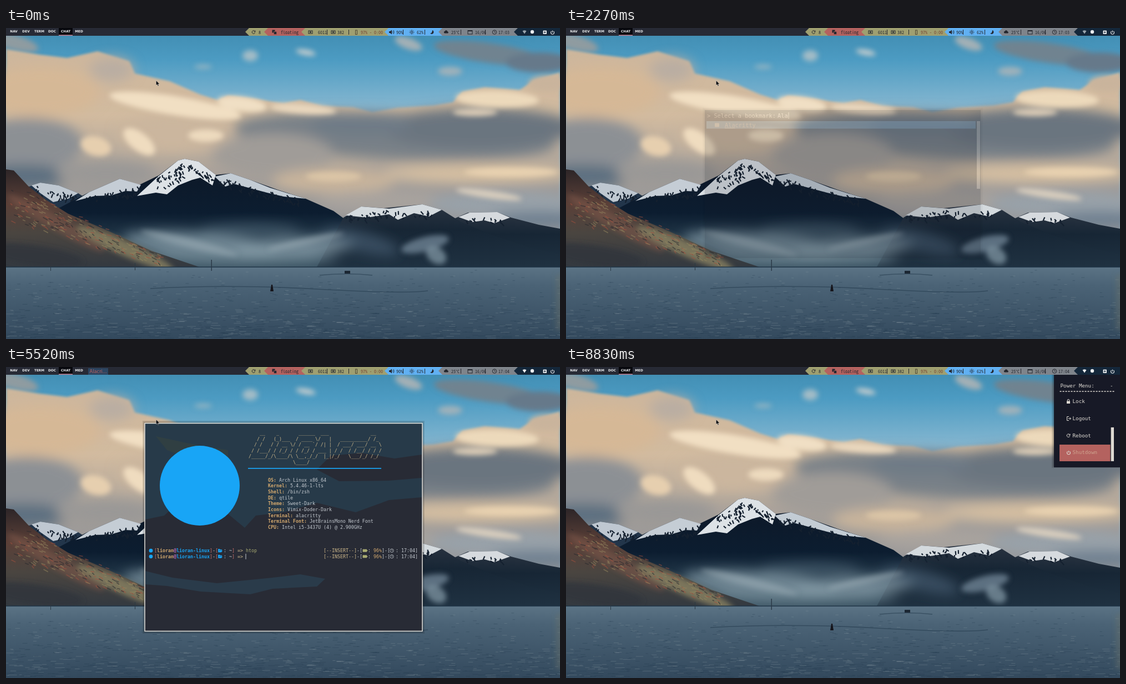
Write an HTML page that moves like this. It is 998 px wide and 561 px high and loops after 8930 ms.

```html
<!DOCTYPE html>
<html lang="en">
<head>
<meta charset="utf-8">
<title>Desktop session</title>
<style>
  html, body { margin: 0; width: 100%; height: 100%; overflow: hidden; background: #31485c; }
  svg { position: absolute; left: 0; top: 0; width: 998px; height: 561px; }
  #wall { will-change: transform; }
  text { white-space: pre; }
  .term { font: 8.3px "DejaVu Sans Mono", monospace; }
  .menu { font: 10.3px "DejaVu Sans Mono", monospace; }
  .power { font: 9.25px "DejaVu Sans Mono", monospace; }
  .bar { font: 8px "Noto Sans Mono CJK JP", "Noto Sans CJK JP", "Noto Sans CJK", monospace; }
  .tag { font: bold 5.8px "DejaVu Sans", sans-serif; text-anchor: middle; }
  .task { font: 8.3px "DejaVu Sans", sans-serif; }
</style>
</head>
<body>
<svg id="wall" viewBox="0 0 998 561"></svg>
<svg id="ui" viewBox="0 0 998 561"></svg>
<script>
const LOOP = 8930;
const $ = id => document.getElementById(id);

let seed = 7;
const rnd = () => (seed = seed * 16807 % 2147483647) / 2147483647;
const times = (n, fn) => Array.from({ length: n }, (_, i) => fn(i)).join('');

const rect = (x, y, w, h, fill, extra = '') =>
  `<rect x="${x}" y="${y}" width="${w}" height="${h}" fill="${fill}" ${extra}/>`;
const path = (d, fill, extra = '') => `<path d="${d}" fill="${fill}" ${extra}/>`;
const stroke = (d, color, width = 1, extra = '') =>
  path(d, 'none', `stroke="${color}" stroke-width="${width}" ${extra}`);
const dot = (x, y, r, fill, extra = '') => `<circle cx="${x}" cy="${y}" r="${r}" fill="${fill}" ${extra}/>`;
const blob = (x, y, rx, ry, fill, turn = 0, alpha = 1) =>
  `<ellipse cx="${x}" cy="${y}" rx="${rx}" ry="${ry}" fill="${fill}" opacity="${alpha}" transform="rotate(${turn} ${x} ${y})"/>`;
const text = (x, y, str, fill, cls, extra = '') =>
  `<text x="${x}" y="${y}" fill="${fill}" class="${cls}" ${extra}>${str}</text>`;
const group = (id, body, extra = '') => `<g id="${id}" ${extra}>${body}</g>`;
const ramp = (id, stops, dir = 'x2="0" y2="1"') => `<linearGradient id="${id}" ${dir}>` +
  stops.map(([o, c]) => `<stop offset="${o}" stop-color="${c}"/>`).join('') + '</linearGradient>';
const blur = (id, d) => `<filter id="${id}" filterUnits="userSpaceOnUse" x="-40" y="-40" width="1080" height="640">` +
  `<feGaussianBlur stdDeviation="${d}"/></filter>`;
const soft = (f, ...parts) => `<g filter="url(#${f})">${parts.join('')}</g>`;

// ---------- wallpaper ----------
const rocks = (x0, y0, x1, y1, n, depth) => stroke(times(n, () => {
  const k = rnd(), x = x0 + (x1 - x0) * k, y = y0 + (y1 - y0) * k + 4 + rnd() * depth;
  return `M${x} ${y}l${-4 + rnd() * 10} ${2 + rnd() * 5}`;
}), '#14202f', 2.2);
const ripples = (n, color) => stroke(times(n, () => {
  const k = Math.sqrt(rnd());
  return `M${rnd() * 998} ${434 + k * 126}h${4 + rnd() * 16 * k}`;
}), color, 1, 'opacity=".3"');
const specks = (n, color) => stroke(times(n, () => {
  const k = rnd();
  return `M${8 + k * 270} ${280 + k * 128 + rnd() * (1 - k * .7) * 70}l${3 + rnd() * 6} ${1 + rnd() * 4}`;
}), color, 1.6, 'opacity=".55"');

$('wall').innerHTML = '<defs>' +
  ramp('sky', [[0, '#3f8bb0'], [.1, '#4c9bc2'], [.25, '#84b6d0'], [1, '#9ab2c0']]) +
  ramp('cloud', [[0, '#cdb69c'], [.3, '#d2bba0'], [.62, '#a09c99'], [1, '#8d9299']]) +
  ramp('peak', [[0, '#0d1726'], [.5, '#0c1d30'], [.75, '#243a4b'], [1, '#324a5a']]) +
  ramp('ridge', [[0, '#2b3441'], [.4, '#172635'], [1, '#1f3141']]) +
  ramp('hill', [[0, '#2c2527'], [.35, '#5b4038'], [.65, '#4a4540'], [1, '#333940']]) +
  ramp('water', [[0, '#5b7385'], [.25, '#4b6376'], [1, '#33495d']]) +
  blur('wide', 11) + blur('mid', 5) + blur('fine', 2) + '</defs>' +
  rect(0, 0, 998, 561, 'url(#sky)') +
  soft('mid', blob(440, 50, 14, 10, '#a3bcc6'), blob(540, 44, 18, 5, '#c3ccce', 10), blob(355, 70, 16, 4, '#8fb3c2'),
    blob(725, 28, 26, 10, '#a3b0b6', 20), blob(870, 45, 100, 18, '#708390', 8), blob(960, 62, 60, 18, '#66798a'),
    blob(800, 78, 22, 8, '#9eb1ba'), blob(10, 25, 50, 14, '#8f9ba0', 15)) +
  soft('fine', path('M0 38L60 48 110 54 165 42 222 60 232 82 295 96 350 120 382 130 400 122 450 128 500 136 530 130 570 141 625 143 660 152 705 144 770 140 805 134 822 115 862 107 925 112 950 95 998 80V440H0Z', 'url(#cloud)')) +
  soft('wide', blob(60, 115, 110, 45, '#d5b896'), blob(190, 75, 40, 22, '#b9ada2'), blob(40, 210, 100, 48, '#8c9094'),
    blob(30, 268, 90, 22, '#5d7080'), blob(180, 262, 90, 24, '#9a9896'), blob(300, 190, 100, 35, '#cbb69e'),
    blob(700, 195, 290, 42, '#788087', 3), blob(850, 180, 180, 36, '#6a747f'), blob(640, 175, 90, 20, '#6e7a86'),
    blob(480, 230, 110, 40, '#a09c98'), blob(590, 275, 110, 22, '#c8b49b'), blob(850, 262, 170, 17, '#d6bfa1'),
    blob(680, 312, 120, 20, '#a8a39e'), blob(900, 318, 140, 24, '#98a1a9'), blob(960, 345, 90, 14, '#6c7e8f')) +
  soft('mid', blob(305, 140, 120, 17, '#f1dfc3', 9), blob(425, 137, 45, 13, '#f0dfc4', 8), blob(535, 146, 60, 9, '#e9d7bd', 4),
    blob(240, 205, 34, 16, '#efdcbf', 38), blob(162, 213, 28, 17, '#e6cfaf', 15), blob(360, 194, 32, 11, '#eddabe'),
    blob(885, 128, 75, 15, '#ecd9bb', 2), blob(845, 152, 40, 7, '#d9cab5'), blob(975, 100, 34, 14, '#c9b49c'),
    blob(590, 268, 50, 9, '#dac4a6'), blob(910, 260, 85, 8, '#e8d1b0'), blob(870, 300, 60, 7, '#d8cdbd', 8)) +
  path('M30 290L62 279 95 284 130 298 180 330V431H0Z', '#22354a') +
  path('M46 284L62 279 95 284 130 298 112 308 85 314 62 298Z', '#bfc8d1') + rocks(50, 280, 125, 296, 32, 14) +
  path('M805 345L832 333 885 332 910 342 960 355 998 362V431H805Z', 'url(#ridge)') +
  path('M815 341L835 333 885 332 908 342 880 352 862 347 840 350Z', '#d6dade') + rocks(825, 336, 900, 338, 12, 10) +
  path('M95 325L150 296 205 272 240 283 275 266 310 239 322 236 347 241 378 265 405 262 440 274 490 292 540 308 590 330 620 352 680 431H70Z', 'url(#peak)') +
  path('M125 312L150 296 205 272 243 283 236 295 215 294 190 302 160 303Z', '#c5cdd5') + rocks(145, 300, 240, 281, 40, 14) +
  path('M236 303L275 267 310 239 322 236 347 241 378 265 372 284 350 270 335 274 310 284 290 300 270 297Z', '#dde2e6') +
  rocks(272, 266, 320, 238, 40, 28) + rocks(325, 238, 378, 264, 30, 13) +
  path('M376 268L405 262 440 274 475 288 540 308 500 304 470 297 440 289 410 281 395 286Z', '#c3ccd4') + rocks(385, 264, 530, 304, 60, 15) +
  path('M608 342L640 322 680 325 750 318 785 328 820 350 880 375 940 395 998 408V431H560Z', 'url(#ridge)') +
  path('M612 338L640 322 665 324 690 326 750 318 785 328 762 340 735 334 706 346 690 336 650 342Z', '#d4dade') +
  rocks(615, 333, 690, 324, 30, 13) + rocks(700, 325, 780, 324, 14, 14) +
  soft('wide', blob(350, 392, 140, 22, '#8299a6', 5, .8), blob(520, 396, 110, 17, '#8fa4b0', -4, .75), blob(440, 365, 90, 12, '#526b7c', 0, .6),
    blob(640, 385, 70, 18, '#4c6578', 15, .6), blob(400, 418, 200, 12, '#6b8391', 0, .7)) +
  soft('mid', blob(755, 390, 44, 13, '#73899a', -14, .75), blob(775, 410, 20, 14, '#8196a3', 35, .75),
    blob(330, 388, 90, 8, '#a0b1b9', 14, .5), blob(540, 385, 70, 6, '#a4b4bc', -12, .5)) +
  path('M0 255L14 257 40 285 72 310 112 335 182 365 262 402 348 431H0Z', 'url(#hill)') +
  soft('mid', blob(90, 352, 100, 12, '#7c5848', 30, .6), blob(215, 398, 95, 13, '#8b8262', 24, .8), blob(50, 410, 90, 18, '#30353b', 8, .8)) +
  specks(70, '#a4503f') + specks(90, '#94875f') + specks(70, '#25272c') +
  rect(0, 431, 998, 130, 'url(#water)') + rect(0, 430.5, 998, 1.5, '#23384a') +
  ripples(620, '#20374b') + ripples(420, '#8d9ca4') +
  stroke('M260 470Q400 462 560 471T760 474M565 446Q615 441 660 446', '#2b4255', 1.6, 'opacity=".7"') +
  path('M476 475L478 463 480 463 482 475Z', '#16151b') + rect(369.5, 418, 1.5, 20, '#2b3a48') +
  rect(610, 438, 10, 5, '#1b2632') + rect(232, 424, 1, 13, '#2a3944') + rect(80, 430, 1, 8, '#2a3944') +
  soft('mid', rect(992, 445, 10, 100, '#6c7468', 'opacity=".5"'));

// ---------- top bar ----------
const ink = '#23262e', white = '#eceef0';
const segment = (tip, fill) => path(`M${tip} 7L${tip + 7} 0H998V14H${tip + 7}Z`, fill);
const label = (x, str, fill = ink) => text(x, 10.6, str, fill, 'bar');
const powerIcon = (x, y, r, c) =>
  stroke(`M${x - r * .6} ${y - r * .7}A${r} ${r} 0 1 0 ${x + r * .6} ${y - r * .7}M${x} ${y - r - .6}V${y}`, c, 1.1);
const loopIcon = (x, y, c) => stroke(`M${x + 2} ${y - 2}A2.8 2.8 0 1 0 ${x + 2.6} ${y + 1}M${x + 3} ${y - 3}v2.4h-2.4`, c, 1);
const tags = [['NAV', 14], ['DEV', 36], ['TERM', 60], ['DOC', 83], ['CHAT', 107.6], ['MED', 131.6]];

const topBar = rect(0, 0, 998, 14, '#272a35') + rect(95, 0, 25, 14, '#07080d') + rect(95, 12.3, 25, 1.7, '#b77f93') +
  tags.map(([s, x]) => text(x, 8.2, s, white, 'tag')).join('') +
  segment(431, '#9f9f70') + segment(465, '#b4625f') + segment(532, '#9f9f70') +
  segment(682, '#61b0f2') + segment(779, '#7f848b') + segment(915, '#14273a') +
  loopIcon(446, 7.5, ink) + label(455, '8') +
  rect(479.5, 3.5, 5, 5, ink) + rect(482.5, 6.5, 5, 5, ink, 'stroke="#b4625f" stroke-width=".6"') + label(495, 'floating') +
  [545, 586].map(x => rect(x, 5, 7, 5, 'none', `stroke="${ink}"`) + rect(x + 2, 6.4, 3, 2.2, ink)).join('') +
  label(562, '6011') + label(597, '382') + [582, 621, 719, 758, 823, 867].map(x => rect(x - 4, 3, 1, 9, ink)).join('') +
  rect(629.5, 4, 3, 7.5, 'none', 'stroke="#4f4a35"') + label(639, '97% - 0:00', '#75402f') +
  path('M690 6h2l3-2.5v8l-3-2.5h-2z', ink) + stroke('M696.5 5.5q1.5 2 0 4M698 4q2.5 3.5 0 7', ink, .8) + label(703, '90%') +
  dot(731, 7.5, 1.8, 'none', `stroke="${ink}"`) +
  times(8, i => stroke('M731 4.6v-1.6', ink, .9, `transform="rotate(${i * 45} 731 7.5)"`)) + label(740, '62%') +
  path('M768 4a3.6 3.6 0 1 1-4 5.600q4 0 4-5.600z', ink) +
  path('M790 9.500a2 2 0 0 1 .6-3.800a2.600 2.600 0 0 1 4.800.6a1.700 1.700 0 0 1 .6 3.200z', ink) + label(802, '25°C') +
  rect(832, 4.5, 8, 6.5, 'none', `stroke="${ink}"`) + rect(832, 4, 8, 2, ink) + label(845, '16/06') +
  dot(880, 7.5, 3.7, 'none', `stroke="${ink}"`) + stroke('M880 5v2.600h2', ink, .8) +
  text(887, 10.6, '', ink, 'bar', 'id="clock"') +
  path('M930.5 5.500q3.500-2.500 7 0L934 10.500z', '#9aa5ae', 'id="wifi"') +
  dot(948, 7, 3.2, white) + rect(967.5, 4.5, 6.5, 6.5, white, 'rx="1"') + stroke('M968.700 7.750h4M970.700 5.750v4', '#14273a', 1) +
  powerIcon(984.5, 8, 3, white) +
  group('task', rect(148, 2, 36, 12, '#2d4560') + text(150.5, 11, 'Alacri...', '#bd625f', 'task'));

// ---------- application menu ----------
const panel = '#171926', cream = '#dedad3';
const shadow = (x, y, w, h) => rect(x - 4, y - 4, w + 8, h + 8, '#000', 'opacity=".12"') + rect(x - 2, y - 2, w + 4, h + 4, '#000', 'opacity=".15"');
const apps = ['Bluetooth Manager', 'Calendar', 'Meadow Source Edit', 'Forgly', 'Gimp', 'Inkscape', 'LibreOffice',
  'Neovim', 'Ranger', 'SpaceFM', 'Tunelio', 'Vim', 'Virtual Workspaces', 'Clipora'];
const menu = shadow(250, 148, 497, 267) + rect(250, 148, 497, 267, panel) +
  text(254, 161.5, '&gt; Select a bookmark:', cream, 'menu') + text(381, 161.5, '', white, 'menu', 'id="query"') +
  rect(0, 152, 1, 12, white, 'id="caret"') + rect(253, 168, 485, 13.5, '#5f9ccb') +
  rect(268, 171.500, 8, 7, white, 'rx="1"') + text(286, 178.6, 'Alacritty', white, 'menu') +
  rect(286, 180, 0, 1, white, 'id="match"') + rect(740, 168, 6, 122, cream) +
  group('apps', apps.map((name, i) => {
    const y = 193 + i * 14.35;
    return dot(272, y - 3.5, 3.8, cream) + text(286, y, name, cream, 'menu');
  }).join(''));

// ---------- terminal ----------
const blue = '#18a5f6', tan = '#d2a86e', pale = '#c3c9cf', red = '#c7716c', olive = '#a9ac72', sand = '#cdb88b';
const baseY = row => 122 + row * 10.61;
const colX = col => 257 + col * 5;
const spans = (col, row, parts) => text(colX(col), baseY(row),
  parts.map(([s, c, bold]) => `<tspan fill="${c}"${bold ? ' font-weight="bold"' : ''}>${s}</tspan>`).join(''), pale, 'term');

const banner = [
  "    __    _       ______  ___               __",
  "   / /   (_)___  / ____ \\/   |   __________/ /_",
  "  / /   / / __ \\/ / __ `/ /| |  / ___/ ___/ __ \\",
  " / /___/ / /_/ / / /_/ / ___ | / /  / /__/ / / /",
  "/_____/_/\\____/\\ \\__,_/_/  |_|/_/   \\___/_/ /_/",
  "                \\____/"];
const info = { OS: 'Arch Linux x86_64', Kernel: '5.4.46-1-lts', Shell: '/bin/zsh', DE: 'qtile', Theme: 'Sweet-Dark',
  Icons: 'Vimix-Doder-Dark', Terminal: 'alacritty', 'Terminal Font': 'JetBrainsMono Nerd Font', CPU: 'Intel i5-3437U (4) @ 2.900GHz' };
const fetchInfo = dot(349, 214, 72, blue) +
  banner.map((s, i) => spans(36, i, [[s, sand]])).join('') + rect(436, 182, 240, 1.7, blue) +
  Object.entries(info).map(([k, v], i) => spans(43, 8 + i, [[k + ':', tan, 1], [' ' + v, pale]])).join('');

const leftPrompt = row => {
  const y = baseY(row) - 3;
  return dot(261, y, 3.4, blue) + spans(2, row, [['[', red], ['lioran', tan, 1], ['@', '#bb6fc0', 1], ['lioran-linux', blue, 1],
    [']', red], ['-', pale], ['[', red], ['  ', pale], [': ~', pale], [']', red], [' =&gt;', sand]]) +
    path(`M382 ${y + 3}v-6h3l1 1h3v1.500h-5zl2-3h6l-2 3z`, blue);
};
const rightPrompt = row => {
  const y = baseY(row) - 3;
  return spans(63, row, [['[--INSERT--]', sand], ['-[', pale], ['  ', pale], [': ', pale], ['96%', tan], [']-[', pale], ['  : 17:04]', pale]]) +
    rect(642.5, y - 2.5, 7.5, 5, olive) + rect(650, y - 1, 1.3, 2, olive) +
    dot(695, y, 3.2, 'none', `stroke="${pale}" stroke-width=".8"`) + stroke(`M695 ${y - 2}v2h1.500`, pale, .7);
};
const command = (id, row) => `<text x="${colX(35)}" y="${baseY(row)}" class="term"><tspan id="${id}"></tspan><tspan id="${id}Rest" fill="#6b7280"></tspan></text>`;

const meter = (col, row, name, fill, value) => spans(col, row, [[name.padEnd(4), blue], ['[', pale, 1], ['|'.repeat(fill), olive],
  [value.padStart(36 - fill), '#7b828c'], [']', pale, 1]]);
const tools = ['/usr/lib/Xorg :0 vt1', 'python /usr/bin/qtile', 'picom -b', 'alacritty', 'htop', '/bin/zsh', 'dunst', 'nm-applet',
  'pulseaudio', '/usr/lib/systemd/systemd --user', 'dbus-daemon --session'];
const processRow = i => {
  const pid = String(i === 4 ? 4127 : 391 + i * 67).padStart(5);
  const share = Math.max(0, 4.6 - i * .7).toFixed(1).padStart(5);
  const line = `${pid} lioran     20   0 ${String(62 + i * 37 % 400).padStart(5)}M ${String(9 + i * 23 % 90).padStart(4)}M  ${String(8 + i * 11 % 40).padStart(4)}M S ${share}  ${(1.9 - i * .06).toFixed(1)}  0:0${i % 9}.${10 + i * 7 % 80} ${tools[i % tools.length]}`;
  return (i ? '' : rect(255, baseY(8) - 8, 490, 10.6, '#4f98b8')) + spans(0, 8 + i, [[line, i ? pale : ink]]);
};
const keys = ['Help  ', 'Setup ', 'Search', 'Filter', 'Tree  ', 'SortBy', 'Nice -', 'Nice +', 'Kill  ', 'Quit  '];
const htop = meter(1, 0, '1', 2, '4.6%') + meter(1, 1, '2', 3, '6.0%') + meter(1, 2, '3', 1, '2.0%') + meter(1, 3, '4', 2, '3.9%') +
  meter(1, 4, 'Mem', 9, '1.02G/7.68G') + meter(1, 5, 'Swp', 0, '0K/8.00G') +
  spans(49, 0, [['Tasks: ', blue], ['68', pale, 1], [', ', blue], ['191', olive, 1], [' thr; ', blue], ['1', olive, 1], [' running', blue]]) +
  spans(49, 1, [['Load average: ', blue], ['0.42 0.51 0.48', pale, 1]]) + spans(49, 2, [['Uptime: ', blue], ['01:12:36', pale, 1]]) +
  rect(255, baseY(7) - 8, 490, 10.6, olive) +
  spans(0, 7, [['  PID USER       PRI  NI  VIRT   RES   SHR S CPU% MEM%   TIME+  Command', ink]]) +
  group('processes', times(24, processRow) +
    keys.map((k, i) => rect(colX(2 + i * 8.300), baseY(33) - 8, 31, 10, '#4f98b8') +
      spans(i * 8.300, 33, [['F' + (i + 1), pale], [k, ink]])).join(''));

const terminal = shadow(250, 101, 500, 376) + rect(250, 101.5, 500, 375, '#282b35') +
  path('M251 102H749V158L700 165 640 155 585 160 560 185 600 206 690 205 749 200V235L690 240 630 262 560 245 500 262 450 268 430 290 400 265 375 240 345 232 310 245 285 268 251 275Z', '#273a49') +
  path('M270 125L340 140 400 150 400 168 340 168 290 150Z', '#36433f', 'opacity=".6"') +
  path('M251 368L300 380 380 390 480 380 530 374 575 382 560 396 480 400 440 410 350 405 290 395 251 392Z', '#2a3b4a') +
  rect(250, 101.5, 500, 375, 'none', 'stroke="#e6e5e0" stroke-width="1.5"') +
  group('shell', group('fetch', fetchInfo) + group('left', leftPrompt(20)) + group('right', rightPrompt(20)) + command('first', 20) +
    group('again', leftPrompt(21) + rightPrompt(21) + command('second', 21)) + rect(0, 0, 1, 10, pale, 'id="cursor"')) +
  group('htop', htop);

// ---------- power menu ----------
const choices = ['Lock', 'Logout', 'Reboot', 'Shutdown'];
const rowY = i => 48 + i * 30.67;
const power = shadow(879, 14, 123, 164) + rect(879, 14, 119, 167, panel) +
  text(890.5, 37.3, 'Power Menu:', cream, 'power') + rect(955, 28, 1.2, 11, cream, 'id="blink"') + text(980, 37.3, '-', cream, 'power') +
  stroke('M889.500 44h98', cream, 1.3, 'stroke-dasharray="3 2"') +
  rect(889, 0, 91.5, 30, '#b4625f', 'id="pick"') + rect(981.7, 0, 5.3, 61, cream, 'id="thumb"') +
  rect(902, 61.500, 6, 4.5, cream) + stroke('M903.300 62v-2a1.700 1.700 0 0 1 3.400 0v2', cream, 1) +
  stroke('M906 89.500h-3.500v7h3.500M904.500 93h5M907.500 91l2 2-2 2', cream, 1) +
  loopIcon(905, 123.7, cream) + powerIcon(905.5, 154.5, 3, cream) +
  choices.map((s, i) => text(912.5, rowY(i) + 17.3, s, cream, 'power', `id="choice${i}"`)).join('');

$('ui').innerHTML = '<defs><clipPath id="below"><rect y="14" width="998" height="547"/></clipPath></defs>' + topBar +
  group('terminal', terminal) + group('menu', menu) + group('power', power, 'clip-path="url(#below)"') +
  path('M270.500 95v8.300l2-1.700 1.200 2.900 1.400-.6-1.200-2.800h2.600z', '#05060a', 'stroke="#d8d8d8" stroke-width=".4"');

// ---------- timeline ----------
const at = (t, start, steps) => steps.reduce((v, [time, next]) => t >= time ? next : v, start);
const attr = (id, name, value) => {
  const el = $(id);
  if (el.getAttribute(name) !== String(value)) el.setAttribute(name, value);
};
const write = (id, str) => { if ($(id).textContent !== str) $(id).textContent = str; };
const show = (id, on) => attr(id, 'visibility', on ? 'inherit' : 'hidden');
const fade = (id, alpha) => { attr(id, 'opacity', alpha); attr(id, 'visibility', alpha ? 'visible' : 'hidden'); };
const valid = ['htop', 'ex', 'exit'];

function typeCommand(id, word, count) {
  const typed = word.slice(0, count);
  write(id, typed);
  write(id + 'Rest', count ? word.slice(count) : '');
  attr(id, 'fill', valid.includes(typed) ? olive : red);
}

function render(t) {
  fade('menu', at(t, 0, [[1390, .12], [1440, .38], [1500, .65], [1560, .92], [1640, .97], [2170, .72], [2220, .44], [2270, .16], [2330, 0]]));
  const letters = at(t, 0, [[1640, 1], [1840, 2], [1950, 3]]);
  write('query', 'Ala'.slice(0, letters));
  attr('caret', 'x', 382 + letters * 6.2);
  attr('match', 'width', letters * 6.2);
  show('apps', !letters);

  fade('terminal', at(t, 0, [[2330, .25], [2380, .5], [2430, .75], [2480, 1], [7030, .8], [7080, .6], [7130, .4], [7180, .2], [7230, 0]]));
  show('task', t >= 2330 && t < 7180);
  write('clock', t < 2330 ? '17:03' : '17:04');
  attr('wifi', 'fill', t < 3690 ? '#9aa5ae' : white);

  const inHtop = t >= 4620 && t < 5520;
  show('shell', !inHtop);
  show('htop', inHtop);
  show('processes', inHtop && t >= 4720);
  show('fetch', t >= 3000);
  show('left', t >= 3230);
  show('right', t >= 3280);
  show('again', t >= 5520);
  const first = at(t, 0, [[3640, 1], [3750, 2], [3960, 3], [4090, 4]]);
  const second = at(t, 0, [[5910, 1], [6090, 2], [6280, 3], [6430, 4]]);
  typeCommand('first', 'htop', first);
  typeCommand('second', 'exit', second);
  const [col, row] = t < 3000 ? [0, -1] : t < 3230 ? [0, 20] : t < 5520 ? [35 + first, 20] : [35 + second, 21];
  attr('cursor', 'x', colX(col) - .5);
  attr('cursor', 'y', baseY(row) - 8);

  fade('power', at(t, 0, [[7720, .25], [7770, .5], [7820, .75], [7870, 1]]));
  const pick = at(t, 0, [[8110, 1], [8310, 2], [8490, 3]]);
  attr('pick', 'y', rowY(pick));
  attr('thumb', 'y', 48 + pick * 20.3);
  choices.forEach((_, i) => attr('choice' + i, 'fill', i === pick ? '#cfa48f' : cream));
  show('blink', t < 8830);
}

const start = performance.now();
function tick() {
  render((performance.now() - start) % LOOP);
  requestAnimationFrame(tick);
}
tick();
</script>
</body>
</html>
```
